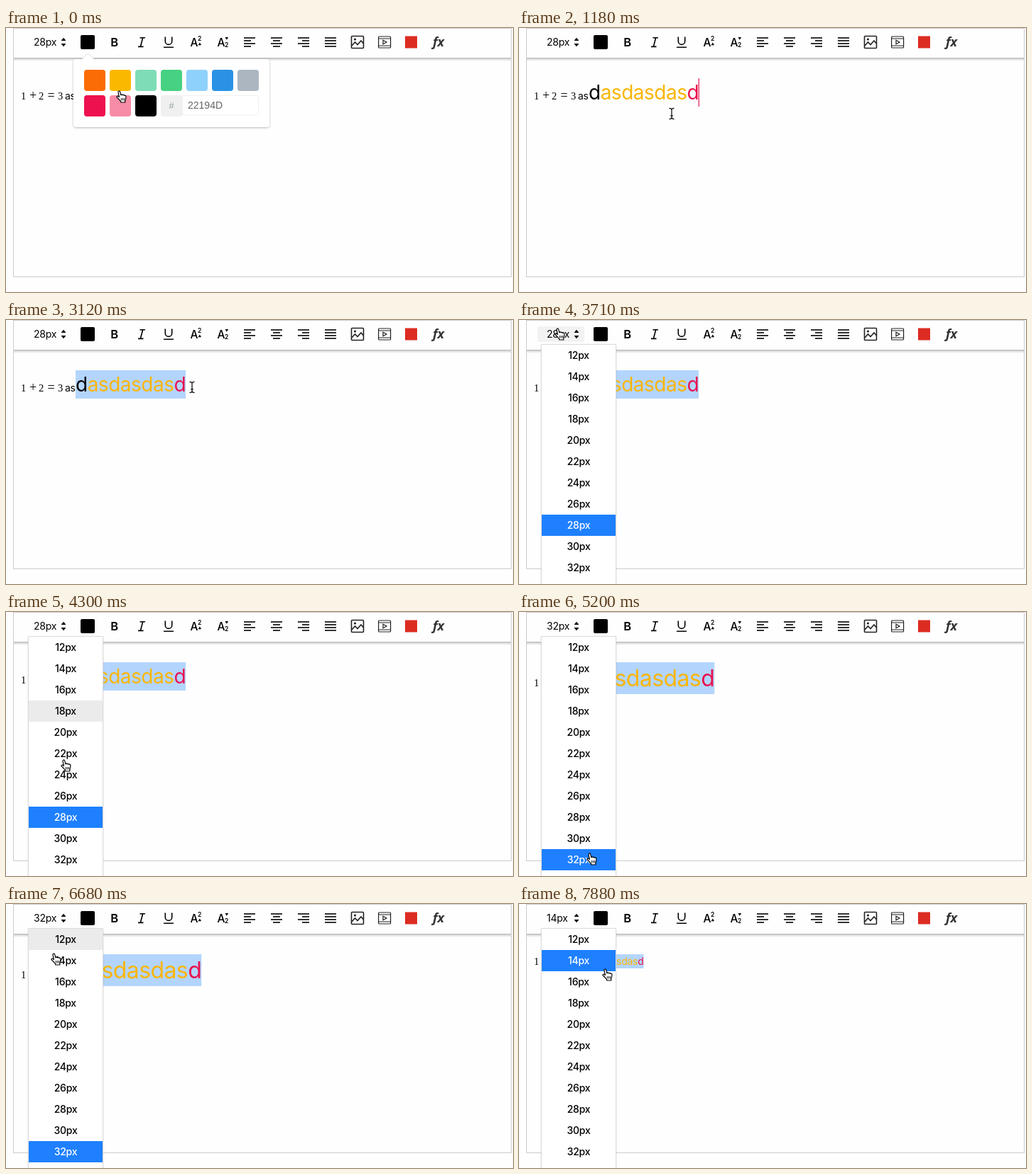
Animation of 714 by 373 pixels, one loop 8 s. Source, as an HTML page:

```html
<!DOCTYPE html>
<html lang="en">
<head>
<meta charset="utf-8">
<title>Rich text editor</title>
<style>
  html, body { margin: 0; width: 100%; height: 100%; overflow: hidden; background: #fefefe; }
  svg { display: block; width: 714px; height: 373px; }
  text { font-family: Inter, "Open Sans", sans-serif; font-size: 14px; letter-spacing: -.018em; white-space: pre; }
  .serif { font-family: "Liberation Serif", serif; font-size: 14.5px; letter-spacing: 0; }
  .serif .op { font-size: 18px; }
  .plain { font-family: "Liberation Sans", sans-serif; letter-spacing: 0; }
  .line { fill: none; stroke: #000; stroke-width: 1.6; }
  .row text { font-weight: 500; text-anchor: middle; }
  .row rect { fill: none; }
  .row.hover rect { fill: #ebebeb; }
  .row.on rect { fill: #1e80ff; }
  .row.on text { fill: #fff; }
  .yellow { fill: #fab508; }
  .red { fill: #e9124f; }
</style>
</head>
<body>
<svg viewBox="0 0 714 373">
  <defs>
    <linearGradient id="fade" x2="0" y2="1">
      <stop offset="0" stop-opacity=".3"/>
      <stop offset=".4" stop-opacity=".13"/>
      <stop offset="1" stop-opacity="0"/>
    </linearGradient>
    <filter id="shadow" x="-10%" y="-10%" width="120%" height="125%">
      <feDropShadow dx="0" dy="1" stdDeviation="1.6" flood-opacity=".28"/>
    </filter>
  </defs>

  <rect width="714" height="373" fill="#fefefe"/>
  <rect x="10.5" y=".5" width="701" height="351" fill="none" stroke="#ccc"/>
  <rect x="11" y="42" width="700" height="5" fill="url(#fade)"/>

  <!-- document line -->
  <rect id="sel" x="98" y="71" fill="#b3d5fd"/>
  <g id="small">
    <text class="serif"><tspan x="21">1</tspan><tspan class="op" x="33">+</tspan><tspan x="46">2</tspan><tspan class="op" x="58.5">=</tspan><tspan x="73">3</tspan></text>
    <text x="83">as</text>
  </g>
  <text id="big" x="98">d<tspan class="yellow">asdasdas</tspan><tspan id="last">d</tspan></text>
  <rect id="caret" y="71" width="1.2" height="40" class="red"/>

  <!-- toolbar -->
  <rect id="labelBg" x="26" y="9" width="66" height="22" rx="3" fill="#f2f2f2"/>
  <text id="label" x="39" y="25">28px</text>
  <path d="M77.5 18 81 13.8 84.5 18ZM77.5 22 81 26.2 84.5 22Z"/>
  <rect id="swatch" x="105" y="10" width="20" height="20" rx="2"/>
  <text x="147.3" y="26" style="font-size:16.5px;font-weight:600">B</text>
  <path class="line" d="M188.5 13.8h7.5M186 26.4h7.5M192.6 14 189.4 26.2"/>
  <path class="line" d="M224.3 12.5v6.2a4.7 4.7 0 0 0 9.4 0v-6.2M222 27.3h14"/>
  <g id="sizers"></g>
  <g id="aligns" class="line"></g>
  <g class="line" style="stroke:#222">
    <rect x="486.5" y="11.5" width="17" height="17" rx="1"/>
    <path d="M487 25l4.5-5 3.5 3.5 5-5.5 3.5 4"/>
    <circle cx="491.5" cy="16" r=".8"/>
    <g stroke-width="1.2">
      <rect x="524.6" y="12" width="17" height="16" rx="1"/>
      <path d="M525 15h16.5M525 25h16.5"/>
      <path d="M531 17.2v5.6l5-2.8z"/>
    </g>
  </g>
  <rect x="562" y="11.5" width="17" height="17" fill="#dc2c22"/>
  <text x="601" y="25.5" fill="#333" style="font:italic 600 18px 'Noto Sans',sans-serif">fx</text>

  <!-- colour popup -->
  <g id="popup">
    <rect x="95" y="44" width="276" height="96" rx="4" fill="#fff" filter="url(#shadow)"/>
    <path d="M106.5 44.5 115.5 35.5 124.5 44.5" fill="#fff" stroke="#ddd"/>
    <rect x="107" y="44" width="17" height="2" fill="#fff"/>
    <g id="chips"></g>
    <rect x="248" y="95.5" width="107.5" height="27.5" rx="3" fill="#fff" stroke="#f0f0f0"/>
    <rect x="218" y="95" width="31" height="30" rx="4" fill="#f0f0f0"/>
    <text class="plain" x="229.5" y="114" fill="#98a1a4" style="font-size:13px">#</text>
    <text class="plain" x="256" y="114" fill="#666">22194D</text>
  </g>

  <!-- size list -->
  <g id="list">
    <rect x="32" y="35" width="104" height="360" fill="#fff" filter="url(#shadow)"/>
    <path d="M31.5 35V373M136.5 35V373M31 34.5h106" stroke="#dcdcdc" fill="none"/>
  </g>

  <g id="hand" stroke="#000" stroke-width="1.2" stroke-linejoin="round" stroke-linecap="round">
    <path fill="#fff" d="M-.6 8.4-2 1.8C-2.3-.3 .1-.7.6 1.1L1.9 5.8C2.2 4.5 4 4.6 4.3 5.9 4.8 4.9 6.4 5.1 6.6 6.5 7.2 5.7 8.8 6 8.9 7.5 9.1 10 8.6 11.2 7.9 13.2L7.8 16H1.8L1.4 14.4C-.4 12.6-1.6 10.4-3.8 9-4.7 7.6-3 6.7-1.8 7.6Z"/>
    <path d="M2.3 10.4v2.8M4.4 10.4v2.8M6.4 10.4v2.8" stroke-width=".9"/>
  </g>
  <g id="beam" fill="none">
    <path id="beamShape" d="M-3.5-7.6C-1-7.6 0-7 0-5.6 0-7 1-7.6 3.5-7.6M-3.5 7.6C-1 7.6 0 7 0 5.6 0 7 1 7.6 3.5 7.6M0-6V6M-2 3H2" stroke="#fff" stroke-width="2.8"/>
    <use href="#beamShape" id="beamInk"/>
    <path d="M-3.5-7.6C-1-7.6 0-7 0-5.6 0-7 1-7.6 3.5-7.6M-3.5 7.6C-1 7.6 0 7 0 5.6 0 7 1 7.6 3.5 7.6M0-6V6M-2 3H2" stroke="#000" stroke-width="1.2"/>
  </g>
</svg>
<script>
const $ = id => document.getElementById(id);
const show = (id, on) => { $(id).style.display = on ? '' : 'none'; };
const set = (id, attrs) => { for (const k in attrs) $(id).setAttribute(k, attrs[k]); };
const add = (id, html) => $(id).insertAdjacentHTML('beforeend', html);

$('beamInk').remove();

// Superscript and subscript size buttons
[[259.5, 17.5, 'M270.5 24.2 272.8 20.4 275.1 24.2Z'], [297.5, 26.5, 'M308.5 13 310.8 16.8 313.1 13Z']].forEach(([x, y, tri]) =>
  add('sizers', `<text x="${x}" y="25.6" style="font-size:15.5px;font-weight:500">A</text>
    <text x="${x + 10.6}" y="${y}" style="font-size:8.5px;font-weight:600">2</text><path d="${tri}"/>`));

// Left, centre, right and justified lines
[0, .5, 1, null].forEach((shift, i) => {
  for (let r = 0; r < 4; r++) {
    const w = r % 2 && shift !== null ? 10 : 16;
    add('aligns', `<path d="M${335 + 38 * i + (16 - w) * (shift || 0)} ${14 + 4 * r}h${w}"/>`);
  }
});

['#fb6c06', '#fab900', '#7edcb6', '#47d182', '#8fd1fd', '#2a92e4', '#abb6c1', '#ee1150', '#f78ca7', '#000'].forEach((c, i) =>
  add('chips', `<rect x="${110 + 36 * (i % 7)}" y="${i < 7 ? 59 : 95}" width="30" height="30" rx="4" fill="${c}"/>`));

const sizes = [12, 14, 16, 18, 20, 22, 24, 26, 28, 30, 32];
sizes.forEach((s, i) =>
  add('list', `<g class="row"><rect x="32" y="${35 + 30 * i}" width="104" height="30"/><text x="84" y="${55 + 30 * i}">${s}px</text></g>`));
const rows = document.querySelectorAll('.row');

// Pointer way points: step, x, y
const path = [
  [0, 160, 89], [3, 126, 106], [5, 196, 164], [8, 215, 121], [9, 214, 121], [16, 122, 98],
  [17, 109, 95], [18, 99, 95], [21, 262, 95], [24, 55, 12], [26, 55, 12], [31, 100, 341],
  [35, 100, 341], [39, 264, 130], [40, 264, 130], [43, 57, 15], [45, 68, 70], [46, 74, 87],
  [47, 74, 87], [48, 75, 86], [49, 74, 87], [52, 74, 87], [53, 122, 92]
];
function pointer(n) {
  const i = path.findIndex(p => p[0] >= n);
  if (i < 0) return path[path.length - 1].slice(1);
  if (i === 0) return path[0].slice(1);
  const [a, ax, ay] = path[i - 1], [b, bx, by] = path[i];
  const k = (n - a) / (b - a);
  return [Math.round(ax + (bx - ax) * k), Math.round(ay + (by - ay) * k)];
}

const within = (n, a, b) => n >= a && n <= b;

function draw(n) {
  const size = n < 35 ? 28 : n < 51 ? 32 : 14;
  const base = 71 + size * 1.066;
  const [x, y] = pointer(n);

  set('small', { transform: `translate(0 ${base})` });
  set('big', { y: base });
  $('big').style.fontSize = size + 'px';
  $('last').setAttribute('class', n < 4 ? 'yellow' : 'red');
  const width = $('big').getComputedTextLength();

  const reach = within(n, 18, 20) ? Math.min(width, Math.max(0, x - 98)) : n > 20 ? width : 0;
  set('sel', { width: reach, height: Math.round(size * 1.42) });
  set('caret', { x: 97.6 + width });
  show('caret', within(n, 4, 17) && Math.floor((n + 4) / 3) % 2 === 0);

  const busy = within(n, 4, 5);
  $('label').textContent = (busy || within(n, 18, 19) ? 14 : size) + 'px';
  set('swatch', { fill: busy ? '#ee1150' : '#000' });
  show('labelBg', within(n, 24, 26) || within(n, 43, 44));
  show('popup', n < 4);

  show('list', within(n, 25, 35) || n >= 44);
  const over = Math.floor((pointer(n - 1)[1] - 35) / 30);
  rows.forEach((row, i) => row.setAttribute('class',
    'row' + (sizes[i] === size ? ' on' : i === over ? ' hover' : '')));

  const text = within(n, 5, 22) || within(n, 36, 42);
  show('beam', text);
  show('hand', !text);
  set(text ? 'beam' : 'hand', { transform: `translate(${x} ${y})` });
}

let last = -1;
const start = performance.now();
function tick() {
  const t = (performance.now() - start) % 8000;
  const n = t < 132 ? 0 : Math.floor((t - 132) / 148.7) + 1;
  if (n !== last) draw(last = n);
  requestAnimationFrame(tick);
}
tick();
</script>
</body>
</html>
```
